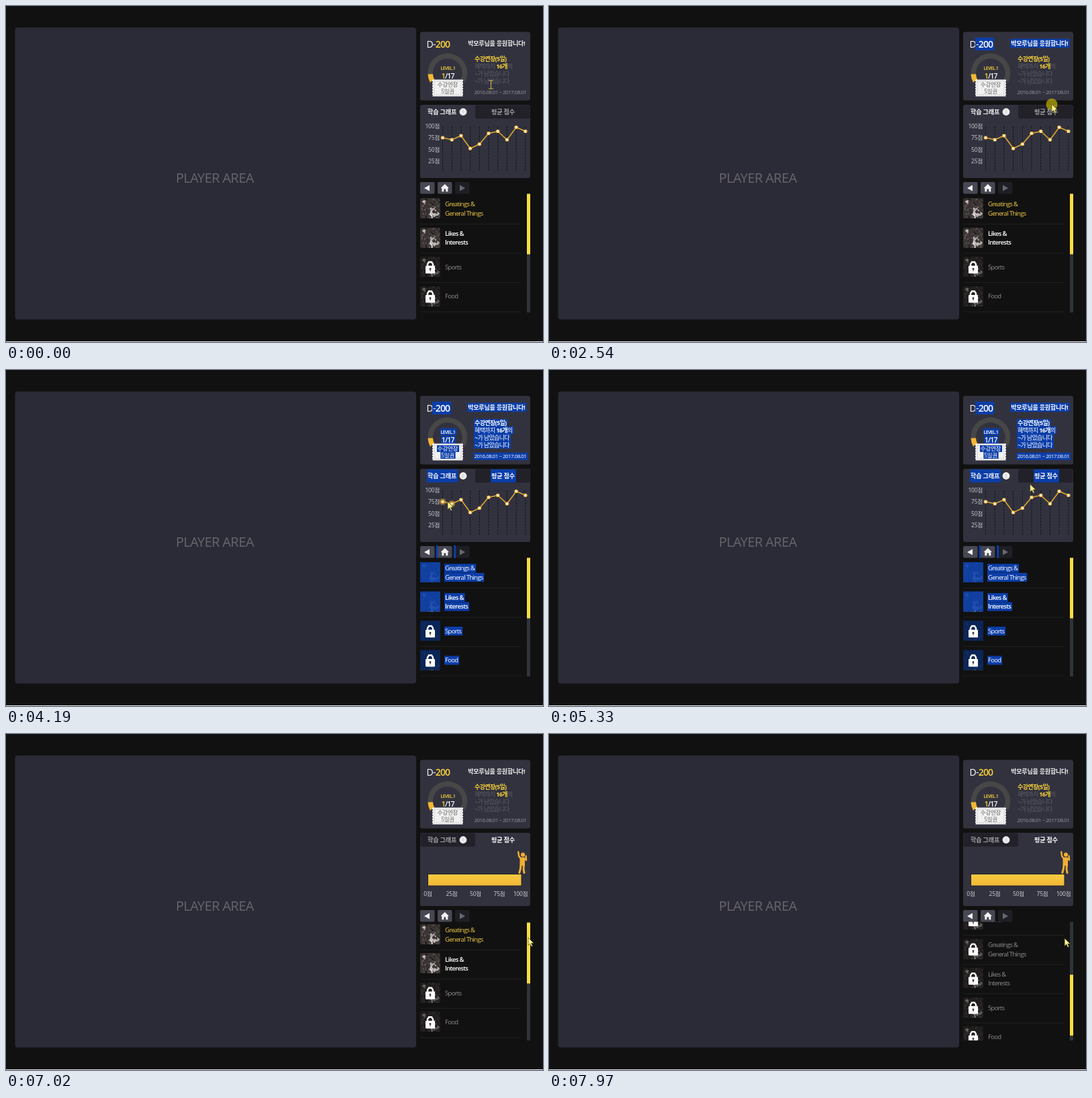
Write an HTML page with a canvas that moves like this. It is 800 px wide and 500 px high and loops after 8 s.

```html
<!DOCTYPE html>
<html lang="ko">
<head>
<meta charset="utf-8">
<style>
  html, body { margin: 0; width: 100%; height: 100%; overflow: hidden; background: #111; }
  canvas { display: block; }
</style>
</head>
<body>
<canvas id="stage" width="800" height="500"></canvas>
<script>
const ctx = document.getElementById('stage').getContext('2d');
const LOOP = 8000, STEP = 200 / 3;
const FONT = '"Open Sans", "Noto Sans CJK KR", sans-serif';
const WHITE = '#fff', YELLOW = '#fbd33b', DIM = '#5c5c67', PANEL = '#32323f', BLUE = '#0b3ea9';
const PRESS = 1530, RELEASE = 3390, CLEAR = 5640, SWITCH = 5700;

// time, x, y of the pointer's hot spot
const PATH = [
  [0, 722.5, 117], [535, 722.5, 117], [1000, 632.5, 48], [1130, 632.5, 48], [1330, 632.5, 53],
  [1500, 632.5, 53], [1733, 650, 54], [2267, 703.5, 61.5], [2533, 749, 146], [3100, 755, 385],
  [3370, 752, 459], [3910, 737, 277], [4190, 658, 196], [5000, 658, 196], [5460, 739, 160],
  [5930, 739, 160], [6260, 752, 230], [6740, 773, 299], [7000, 778, 303], [7430, 770, 304],
  [7970, 768, 304], [LOOP, 768, 304]
];
const SCORES = [196, 199, 193, 212, 205.5, 189.5, 186.5, 199, 180.5, 186.5];
const LESSONS = [['Greatings &', 'General Things'], ['Likes &', 'Interests'], ['Sports'], ['Food']];

let now = 0, cursor = { x: 0, y: 0 };

const clamp = (v, lo, hi) => Math.min(hi, Math.max(lo, v));

function cursorAt(t) {
  const i = PATH.findIndex((key, n) => n && t <= key[0]);
  const [t0, x0, y0] = PATH[i - 1], [t1, x1, y1] = PATH[i];
  const k = (t - t0) / (t1 - t0);
  return { x: x0 + (x1 - x0) * k, y: y0 + (y1 - y0) * k };
}

const selected = from => now >= from && now < CLEAR;

function box(x, y, w, h, color, r = 0, c = ctx) {
  c.fillStyle = color;
  c.beginPath();
  c.roundRect(x, y, w, h, r);
  c.fill();
}

function dot(x, y, r, color) {
  ctx.fillStyle = color;
  ctx.beginPath();
  ctx.arc(x, y, r, 0, 7);
  ctx.fill();
}

function poly(points, color) {
  ctx.fillStyle = color;
  ctx.beginPath();
  points.forEach(([x, y]) => ctx.lineTo(x, y));
  ctx.closePath();
  ctx.fill();
}

function line(points, color, width) {
  ctx.strokeStyle = color;
  ctx.lineWidth = width;
  ctx.beginPath();
  points.forEach(([x, y]) => ctx.lineTo(x, y));
  ctx.stroke();
}

// runs: [string, color, weight]; y is the middle of the capitals
function text(runs, x, y, { size = 9, gap = 0, align = 0, sel, height = 11, follow } = {}) {
  ctx.letterSpacing = gap + 'px';
  const setFont = weight => ctx.font = `${weight || 400} ${size}px ${FONT}`;
  const widths = runs.map(([s, , weight]) => (setFont(weight), ctx.measureText(s).width));
  const total = widths.reduce((a, b) => a + b, 0);
  const left = x - total * align;
  const paint = override => {
    let at = left;
    runs.forEach(([s, color, weight], i) => {
      setFont(weight);
      ctx.fillStyle = override || color;
      ctx.fillText(s, at, y + size * 0.36);
      at += widths[i];
    });
  };
  paint();
  if (!sel || !selected(sel)) return;
  const full = total + 3;
  const width = follow && now < 2320 ? clamp(cursor.x - left, 0, full) : full;
  ctx.save();
  ctx.beginPath();
  ctx.rect(left - 1, y - height / 2, width, height);
  ctx.clip();
  ctx.fillStyle = BLUE;
  ctx.fillRect(left - 1, y - height / 2, width, height);
  paint(WHITE);
  ctx.restore();
}

function makePhoto() {
  const canvas = document.createElement('canvas');
  canvas.width = canvas.height = 30;
  const c = canvas.getContext('2d');
  let seed = 11;
  const rnd = () => (seed = seed * 16807 % 2147483647) / 2147483647;
  c.beginPath();
  c.roundRect(0, 0, 30, 30, 2);
  c.clip();
  box(0, 0, 30, 30, '#3b3433', 0, c);
  for (let i = 0; i < 150; i++) {
    const x = rnd() * 30, y = rnd() * 30;
    const bright = Math.hypot(x - 19, y - 20) < 8 || Math.hypot(x - 5, y - 7) < 4;
    const tone = Math.round(bright ? 140 + rnd() * 110 : 25 + rnd() * 75);
    box(x, y, 1 + rnd() * 2.5, 1 + rnd() * 2.5, `rgb(${tone},${tone - 5},${tone - 6})`, 1, c);
  }
  return canvas;
}
const photo = makePhoto();

function drawTicket() {
  box(635, 109.5, 46, 25, '#f1f1f1', 1);
  [634.5, 681.5].forEach(x => {
    for (let y = 113; y < 134; y += 4) dot(x, y, 1.3, PANEL);
  });
  ctx.setLineDash([2, 1]);
  ctx.strokeStyle = '#b5b5b5';
  ctx.lineWidth = 0.7;
  ctx.strokeRect(638, 112, 40, 20);
  ctx.setLineDash([]);
  text([['수강연장', '#666']], 658, 117, { size: 8.5, gap: -0.2, align: 0.5, sel: 2600, height: 10 });
  text([['5일권', '#666']], 658, 127, { size: 8.5, gap: -0.3, align: 0.5, sel: 2600, height: 10 });
}

function drawStatus() {
  box(617, 38.5, 164, 102, PANEL, 3);
  text([['D', WHITE]], 626.5, 56.5, { size: 14, gap: -0.8 });
  text([['-', WHITE], ['200', YELLOW, 600]], 636, 56.5,
    { size: 14, gap: -0.8, sel: PRESS, height: 19, follow: true });
  text([['박모루님을 응원합니다!', '#f2f2f2', 700]], 773.5, 55.5,
    { gap: -0.2, align: 1, sel: PRESS, height: 14, follow: true });

  const ring = (from, to, color) => {
    ctx.strokeStyle = color;
    ctx.lineWidth = 7.5;
    ctx.beginPath();
    ctx.arc(657.8, 100, 25.6, from * Math.PI / 180, to * Math.PI / 180);
    ctx.stroke();
  };
  ring(150, 390, '#474747');
  ring(152, 177, '#f3b733');
  text([['LEVEL.1', YELLOW, 600]], 658.3, 92, { size: 7, gap: -0.6, align: 0.5, sel: 2600 });
  text([['1', YELLOW, 600], ['/17', WHITE, 600]], 658.3, 104,
    { size: 10.5, gap: -0.8, align: 0.5, sel: 2600, height: 12 });
  drawTicket();

  const info = { gap: -0.65, sel: 2600 };
  text([['수강연장(5일)', YELLOW, 700]], 698, 78.5, info);
  text([['혜택까지 ', DIM], ['16개', YELLOW, 700], ['의', DIM]], 698, 89.5, info);
  text([['~가 남았습니다', DIM]], 698, 100.5, info);
  text([['~가 남았습니다', DIM]], 698, 111.5, info);
  text([['2016.08.01 ~ 2017.08.01', '#96969c']], 697.5, 128.5, { size: 8, gap: -0.55, sel: 2600 });
}

function drawGraph() {
  ['100점', '75점', '50점', '25점'].forEach((s, i) =>
    text([[s, '#cfcfd2', 500]], 646, 178.5 + i * 17.5, { size: 8.5, gap: -0.2, align: 1 }));
  const points = SCORES.map((y, i) => [650.5 + i * 13.7, y]);
  ctx.setLineDash([3, 1.5]);
  points.forEach(([x]) => line([[x, 179], [x, 246]], '#15151b', 1));
  ctx.setLineDash([]);
  line(points, '#dba632', 1.6);
  points.forEach(([x, y]) => {
    if (Math.hypot(cursor.x - x, cursor.y - y) < 8) dot(x, y, 5, 'rgba(235,185,50,.45)');
    dot(x, y, 2.8, '#eeb03a');
    dot(x, y, 1.6, WHITE);
  });
}

function drawPerson() {
  const color = '#f0b033';
  ctx.lineCap = ctx.lineJoin = 'round';
  dot(770, 179.5, 3.1, color);
  line([[763.2, 175.5], [764.2, 182], [767, 185.5]], color, 2.4);
  line([[771, 185], [775, 187.5], [774.5, 181.5]], color, 2.4);
  poly([[765.5, 183.5], [773, 183.5], [773, 196], [765.5, 196]], color);
  line([[767, 195], [766.3, 201], [764.8, 206.5]], color, 2.9);
  line([[771.4, 195], [771, 201], [772, 206.5]], color, 2.9);
  ctx.lineCap = 'butt';
  ctx.lineJoin = 'miter';
}

function drawAverage() {
  const fill = ctx.createLinearGradient(0, 209, 0, 226);
  fill.addColorStop(0, '#f9cb42');
  fill.addColorStop(1, '#efb634');
  box(628, 208, 140.5, 18.5, '#21212a');
  box(629, 209, 138.5, 16.5, fill);
  drawPerson();
  ['0점', '25점', '50점', '75점', '100점'].forEach((s, i) =>
    text([[s, '#d5d5d8', 500]], [628.5, 664, 699.5, 735, 766.5][i], 238, { size: 8.5, gap: -0.2, align: 0.5 }));
}

function drawTabs() {
  const average = now >= SWITCH;
  box(617, 147, 164, 109, PANEL, 3);
  box(average ? 617.5 : 699, 147.5, 81.5, 20, '#222129', 2);
  const tab = { gap: -0.1, sel: 2650, height: 20 };
  text([['학습 그래프', average ? '#a5a5a8' : WHITE, 700]], 628, 157.5, tab);
  text([['평균 점수', average ? WHITE : '#a5a5a8', 700]], 723, 157.5, tab);
  dot(681, 157.5, 5.4, '#ececec');
  text([['!', '#aaa']], 681, 157.5, { size: 7, align: 0.5 });
  (average ? drawAverage : drawGraph)();
}

function drawNav() {
  box(617, 262, 21.5, 17.5, '#484854', 2);
  box(643, 262, 21.5, 17.5, '#484854', 2);
  box(669, 262, 21.5, 17.5, '#1e1e25', 2);
  poly([[623, 271], [631, 266.5], [631, 275.5]], '#f2f2f2');
  poly([[684, 271], [676, 266.5], [676, 275.5]], '#686870');
  poly([[653.8, 265], [660, 271], [658.3, 271], [658.3, 276.3], [655.3, 276.3], [655.3, 272.5],
    [652.3, 272.5], [652.3, 276.3], [649.3, 276.3], [649.3, 271], [647.6, 271]], '#f2f2f2');
  if (selected(2730)) [640.5, 667].forEach(x => box(x, 261, 3, 19, BLUE));
}

function drawLock(x, y) {
  line([[x - 4, y + 1], [x - 4, y - 4], [x - 2, y - 7], [x + 2, y - 7], [x + 4, y - 4], [x + 4, y + 1]], WHITE, 2.4);
  box(x - 7, y - 1.5, 14, 11.5, WHITE, 1);
  dot(x, y + 3.2, 1.4, '#333');
  box(x - 0.6, y + 3.2, 1.2, 3.3, '#333');
}

function drawList() {
  const scroll = Math.max(0, now - 6980) * 0.163;
  ctx.save();
  ctx.beginPath();
  ctx.rect(617, 279.5, 164, 176.5);
  ctx.clip();
  for (let i = 0; i < 8; i++) {
    const top = 286 + i * 43.5 - scroll, locked = i > 1;
    const sel = i < 4 ? [2877, 2975, 3076, 3220][i] : LOOP;
    ctx.drawImage(photo, 617, top);
    if (locked) box(617, top, 30, 30, 'rgba(10,10,10,.5)', 2);
    if (selected(sel)) box(617, top, 30, 30, locked ? 'rgba(8,38,95,.88)' : 'rgba(11,65,175,.88)');
    if (locked) drawLock(632, top + 15);
    const lines = LESSONS[i % 4];
    const color = i === 0 ? '#f1cb45' : locked ? '#8d8d8d' : WHITE;
    lines.forEach((s, n) =>
      text([[s, color, i === 1 ? 600 : 400]], 654, top + (lines.length > 1 ? 9 + n * 13.5 : 15.5),
        { size: 9.5, gap: -0.7, sel, height: 13.5 }));
    box(617, top + 38, 150, 1, '#202020');
  }
  box(776, 279, 5, 178, '#303338');
  box(776, 279 + scroll * 0.51, 5, 90.5, '#fbdd45');
  ctx.restore();
}

function drawCursor() {
  const { x, y } = cursor;
  const pressed = (now >= PRESS - 15 && now < RELEASE) || (now >= CLEAR && now < 5780);
  if (pressed) dot(x, y, 8.5, 'rgba(205,190,0,.66)');
  if (now < 2350) {
    const color = pressed ? '#e9dc3c' : '#d9bd62';
    line([[x, y - 6], [x, y + 6]], color, 1);
    line([[x - 3.5, y - 6], [x + 3.5, y - 6]], color, 1);
    line([[x - 3.5, y + 6], [x + 3.5, y + 6]], color, 1);
    return;
  }
  const arrow = [[0, 0], [0, 11.5], [2.7, 9], [4.7, 13.3], [6.5, 12.4], [4.6, 8.3], [8.2, 8.2]]
    .map(([dx, dy]) => [x + dx, y + dy]);
  poly(arrow, '#fff58c');
  line([...arrow, arrow[0]], '#3a3618', 0.6);
}

function draw(t) {
  now = Math.floor((t + 15) / STEP) * STEP % LOOP;
  cursor = cursorAt(now);
  box(0, 0, 800, 500, '#111');
  box(0, 499, 800, 1, '#e6e6e6');
  box(13.5, 32, 597.5, 434.5, '#2b2a37', 4);
  text([['PLAYER AREA', '#66666a']], 253, 256, { size: 20, gap: -0.6 });
  drawStatus();
  drawTabs();
  drawNav();
  drawList();
  drawCursor();
}

const start = performance.now();
(function frame() {
  draw((performance.now() - start) % LOOP);
  requestAnimationFrame(frame);
})();
</script>
</body>
</html>
```
